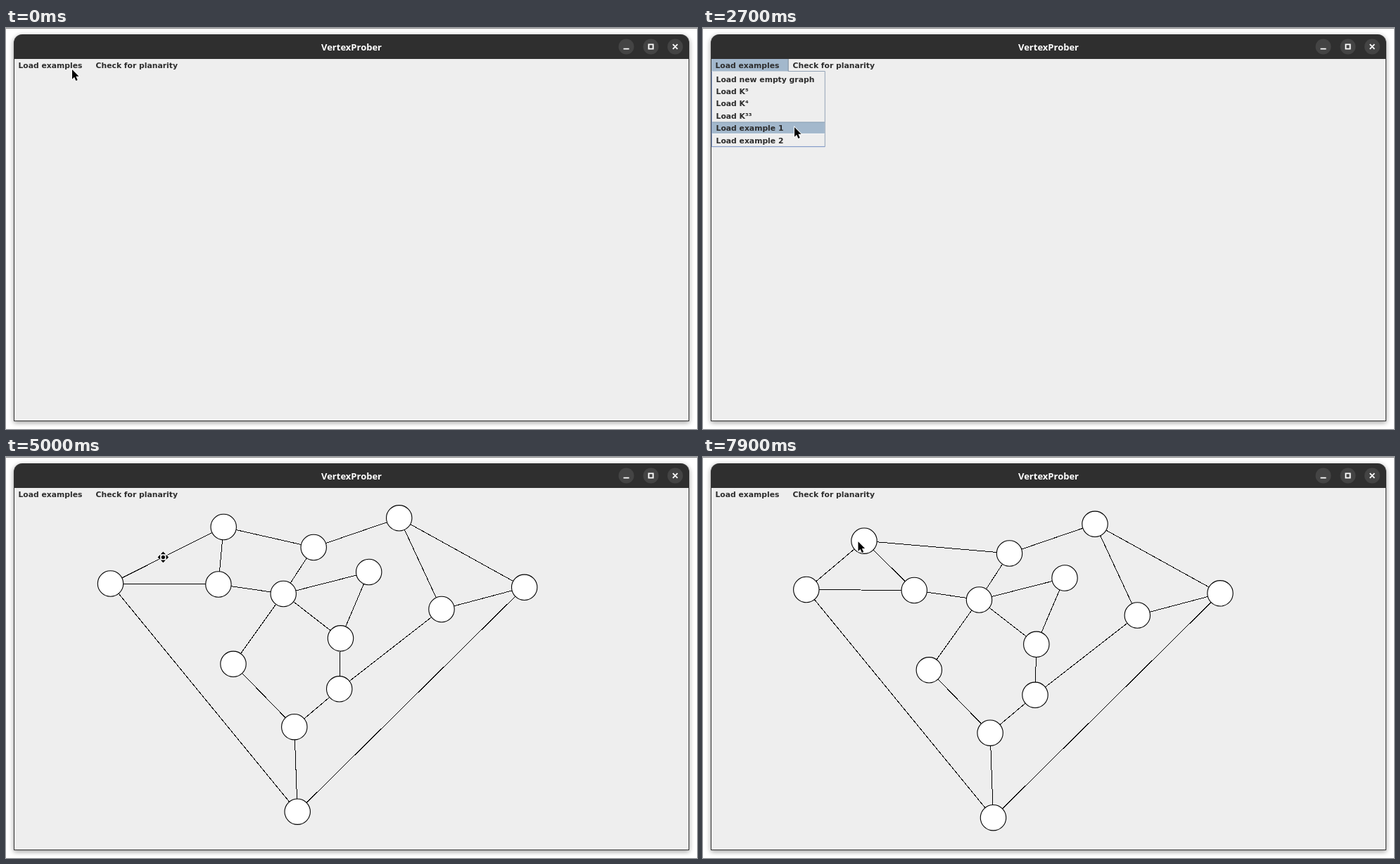
Write an HTML page that moves like this. It is 982 by 570 pixels and loops after 8000 ms.

```html
<!DOCTYPE html>
<html lang="en">
<head>
<meta charset="utf-8">
<title>VertexProber</title>
<style>
  html, body { margin: 0; width: 100%; height: 100%; overflow: hidden; background: #fff; }
  body { position: relative; }
  .top { position: absolute; left: 0; top: 0; width: 982px; height: 1px; background: #8a8a8a; }
  .window {
    position: absolute; left: 11px; top: 9px; width: 958px; height: 549px;
    border: 1px solid #333; border-top: 0; border-radius: 12px 12px 0 0;
    background: linear-gradient(#2f2f2f 35px, #eee 35px);
    box-shadow: 0 2px 7px rgba(0, 0, 0, .4);
  }
  svg { position: absolute; left: 0; top: 0; display: block; }
  text { font: bold 10.8px "DejaVu Sans", sans-serif; fill: #2c2c2c; }
  .title { font: 600 13px "Noto Sans", "Open Sans", sans-serif; fill: #fff; text-anchor: middle; }
  .lit { fill: #a3b8cc; }
  .edge { fill: none; stroke: #000; shape-rendering: crispEdges; }
  .node { fill: #fff; stroke: #000; stroke-width: 1.1; }
  .icon { fill: none; stroke: #fff; stroke-width: 1.9; }
  #move path, #arrow path { fill: #000; stroke: #fff; stroke-width: 1.6; paint-order: stroke; }
</style>
</head>
<body>
<div class="top"></div>
<div class="window"></div>
<svg width="982" height="570" viewBox="0 0 982 570">
  <clipPath id="client"><rect x="12" y="44" width="958" height="514"/></clipPath>

  <text class="title" x="491" y="32">VertexProber</text>
  <g fill="#444">
    <circle cx="881.5" cy="26.5" r="11"/>
    <circle cx="916.5" cy="26.5" r="11"/>
    <circle cx="951" cy="26.5" r="11"/>
  </g>
  <path class="icon" d="M877.5 29.6h8M913.4 23.4h6.2v6.2h-6.2zM947.7 23.2l6.6 6.6m0-6.6l-6.6 6.6"/>

  <g id="graph" clip-path="url(#client)"></g>

  <g id="tab">
    <rect class="lit" x="12" y="44" width="109" height="18"/>
    <path d="M121.2 44v18" stroke="#7a8a99"/>
  </g>
  <text x="17.4" y="56.6">Load examples</text>
  <text x="127.6" y="56.6">Check for planarity</text>

  <g id="popup">
    <rect x="12" y="61.5" width="161.3" height="107.2" fill="#eee"/>
    <path d="M121 61.5h52.3v107.2" fill="none" stroke="#8a9bb0" stroke-width=".9"/>
    <path d="M12.3 62v106.7h161" fill="none" stroke="#6382bf" stroke-width=".9"/>
    <g id="bar">
      <rect class="lit" x="12.8" width="160" height="16.6"/>
      <path d="M12.8 .4h160" stroke="#8497aa" stroke-width=".8"/>
      <path d="M12.8 16.8h160" stroke="#fff" stroke-width=".8"/>
    </g>
  </g>

  <g id="arrow">
    <path d="M0 0V13.8L3.1 10.8L5.4 16L7.7 14.9L5.4 9.8H9.6Z"/>
  </g>
  <g id="move">
    <path d="M0-7.8L3.6-4.2H-3.6ZM0 7.8L3.6 4.2H-3.6ZM-7.8 0L-4.2-3.6V3.6ZM7.8 0L4.2-3.6V3.6Z"/>
    <circle r="3.7" fill="#fff"/>
    <circle r="2.6"/>
  </g>
</svg>
<script>
const LOOP = 8000, ROW = 17.4, MENU_TOP = 64;
const MENU_OPENS = 500, GRAPH_LOADS = 3000;
const PAN = [3800, 5900], PULL = [6900, 7900];   // the two drags
const PULLED = 1, GRIP = [8.5, -1];              // dragged node, its offset from the pointer
const LEAD = 70;                                 // the pointer runs ahead of what it drags

const byId = id => document.getElementById(id);
const place = (el, x, y) => el.setAttribute('transform', `translate(${x} ${y})`);
const show = (id, on) => { byId(id).style.display = on ? '' : 'none'; };
const within = (t, [from, to]) => t >= from && t < to;
const snap = (t, fps) => Math.floor(t * fps / 1000) * 1000 / fps;

function add(parent, tag, attrs, content = '') {
  const el = document.createElementNS('http://www.w3.org/2000/svg', tag);
  for (const key in attrs) el.setAttribute(key, attrs[key]);
  el.textContent = content;
  return byId(parent).appendChild(el);
}

const items = ['Load new empty graph', 'Load K⁵', 'Load K⁴', 'Load K³³',
  'Load example 1', 'Load example 2'];
items.forEach((label, i) => add('popup', 'text', { x: 18.5, y: 76.6 + i * ROW }, label));

const nodes = [
  [86.3, 185.5], [247, 105], [239.7, 186.5], [375, 134], [332, 200],
  [453.5, 169], [496.5, 92.3], [674.5, 190.8], [556.8, 222], [413.3, 263.3],
  [411.5, 335.3], [260.8, 299.8], [347.6, 389.2], [352, 509.7]
];
// Edges as walks through the nodes
const walks = [[0, 1, 3, 6, 7, 13, 0], [0, 2, 4, 11, 12, 13], [1, 2], [3, 4, 5, 9, 4],
  [9, 10, 12], [6, 8, 7], [8, 10]];
const edges = walks.map(() => add('graph', 'polyline', { class: 'edge' }));
const circles = nodes.map(() => add('graph', 'circle', { class: 'node', r: 18.2 }));

// Turning points of the pointer: time, x, y
const path = [
  [900, 94, 59], [1600, 122, 137], [1850, 123, 92], [2000, 125, 111], [2700, 130, 141],
  [3200, 161, 150], [3850, 161, 150], [4000, 167.5, 150], [4280, 245, 192],
  [4500, 205, 186.5], [4600, 215, 164], [4720, 233, 160], [5000, 223.2, 144.5],
  [5150, 223.5, 140], [5500, 221.5, 153], [6100, 221.5, 153], [6400, 294, 113],
  [6600, 299, 109], [7000, 299, 109], [7200, 272.5, 109.5], [7500, 239.5, 113.5],
  [7833, 220.5, 120.2]
];

function pointer(t) {
  const next = path.findIndex(([time]) => time > t);
  if (next < 1) return path.at(next).slice(1);
  const [t0, x0, y0] = path[next - 1], [t1, x1, y1] = path[next];
  const k = (t - t0) / (t1 - t0);
  return [x0 + (x1 - x0) * k, y0 + (y1 - y0) * k];
}

function drawMenu(t) {
  const open = within(t, [MENU_OPENS, GRAPH_LOADS]);
  const row = Math.floor((pointer(t - 100)[1] - MENU_TOP) / ROW);   // highlight lags a little
  show('tab', open);
  show('popup', open);
  show('bar', row >= 0);
  place(byId('bar'), 0, MENU_TOP + row * ROW);
}

function drawGraph(t) {
  show('graph', t >= GRAPH_LOADS);
  const [startX, startY] = pointer(PAN[0]);
  const [x, y] = pointer(Math.min(Math.max(t, PAN[0]), PAN[1]));
  const at = nodes.map(node => [node[0] + x - startX, node[1] + y - startY]);
  if (t >= snap(PULL[0], 6)) at[PULLED] = pointer(t).map((v, i) => v + GRIP[i]);
  circles.forEach((el, i) => place(el, ...at[i]));
  edges.forEach((el, i) => el.setAttribute('points', walks[i].map(n => at[n]).join(' ')));
}

function draw(time) {
  const dragging = within(time, PAN) || within(time, PULL);
  const t = snap(time, dragging ? 6 : 10);   // redraws are slower during a drag
  drawMenu(t);
  drawGraph(t);
  show('arrow', !dragging);
  show('move', dragging);
  place(byId(dragging ? 'move' : 'arrow'), ...pointer(dragging ? t + LEAD : t));
}

function tick() {
  draw(performance.now() % LOOP);
  requestAnimationFrame(tick);
}
tick();
</script>
</body>
</html>
```
